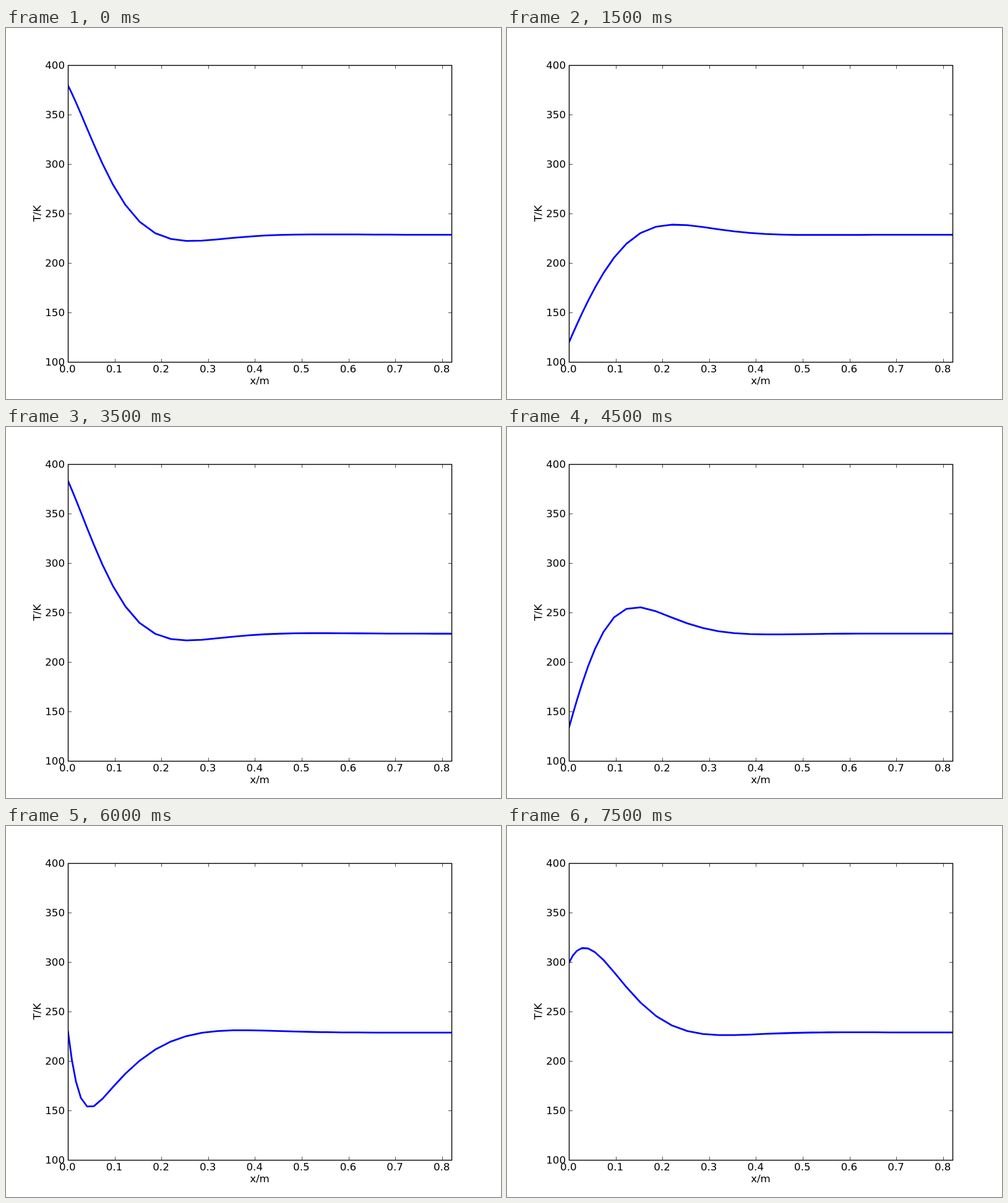
Write an HTML page that moves like this. It is 800x600 px and loops after 8000 ms.

```html
<!DOCTYPE html>
<html lang="en">
<head>
<meta charset="utf-8">
<title>Temperature profile</title>
<style>
  html, body { margin: 0; width: 100%; height: 100%; overflow: hidden; background: #fff; }
  svg { display: block; width: 800px; height: 600px; }
  text { font: 16.67px "DejaVu Sans", sans-serif; fill: #000; text-anchor: middle; }
  .end { text-anchor: end; }
  #curve { fill: none; stroke: #00f; stroke-width: 2.78; stroke-linejoin: round; }
  #ticks { fill: none; stroke: #000; stroke-width: .7; }
  #frame { fill: none; stroke: #000; stroke-width: 1.39; }
</style>
</head>
<body>
<svg viewBox="0 0 800 600">
  <clipPath id="plot"><rect x="100" y="60" width="620" height="480"/></clipPath>
  <polyline id="curve" clip-path="url(#plot)"/>
  <path id="ticks"/>
  <rect id="frame" x="100.5" y="60.5" width="620" height="480"/>
  <g id="labels"></g>
  <text x="410" y="576">x/m</text>
  <text transform="translate(56 300) rotate(-90)">T/K</text>
</svg>
<script>
const $ = id => document.getElementById(id);

const LEFT = 100, TOP = 60, RIGHT = 720, BOTTOM = 540;
const PX_PER_M = 620 / 0.82, PX_PER_K = 1.6;
const toX = m => LEFT + m * PX_PER_M;
const toY = kelvin => BOTTOM - (kelvin - 100) * PX_PER_K;

function drawAxes() {
  const snap = v => Math.round(v) + 0.5;
  const len = 5.6;
  let path = '';
  const label = (x, y, str, cls) => {
    const el = document.createElementNS('http://www.w3.org/2000/svg', 'text');
    el.setAttribute('x', x);
    el.setAttribute('y', y);
    if (cls) el.setAttribute('class', cls);
    el.textContent = str;
    $('labels').append(el);
  };
  for (let i = 0; i <= 8; i++) {
    const x = toX(i / 10);
    path += `M${snap(x)} ${TOP + 0.5}v${len}M${snap(x)} ${BOTTOM + 0.5}v${-len}`;
    label(x - 0.7, 557, (i / 10).toFixed(1));
  }
  for (let k = 100; k <= 400; k += 50) {
    const y = toY(k);
    path += `M${LEFT + 0.5} ${snap(y)}h${len}M${RIGHT + 0.5} ${snap(y)}h${-len}`;
    label(95, y + 6, k, 'end');
  }
  $('ticks').setAttribute('d', path);
}

// Heat conduction into ground lit by a rising and setting sun.
// Time unit: one step of the animation. Flux unit: (T / 100 K)^4.
const STEPS = 16, STEP_MS = 500;
const DAY = 7.087, NOON = -0.571, SUN = 239.4;
const DIFFUSIVITY = 0.00395, CONDUCTIVITY = 0.00188;
const DEEP_T = 230.2, WARM_UP = 5 * 7, SUBSTEPS = 1000;

// Depth grid: fine near the surface, even below.
const depth = [0, 6.5, 13, 21, 31, 42, 56, 73, 93];
for (let i = 0; i <= 20; i++) depth.push(116 + 25.2 * i);
depth.forEach((px, i) => { depth[i] = px / PX_PER_M; });

function simulate() {
  const last = depth.length - 1;
  const gap = depth.slice(1).map((x, i) => x - depth[i]);
  const width = depth.map((_, i) => ((gap[i - 1] || 0) + (gap[i] || 0)) / 2);
  const T = depth.map(() => DEEP_T);
  const dt = 1 / SUBSTEPS;
  const profiles = [];
  for (let step = -WARM_UP; step < STEPS; step++) {
    if (step >= 0) profiles.push(T.slice());
    for (let s = 0; s < SUBSTEPS; s++) {
      const angle = 2 * Math.PI * (step + s * dt - NOON) / DAY;
      const sun = SUN * Math.max(0, Math.cos(angle));
      let above = ((T[0] / 100) ** 4 - sun) / CONDUCTIVITY;
      for (let i = 0; i <= last; i++) {
        const below = i < last ? (T[i + 1] - T[i]) / gap[i] : 0;
        T[i] += dt * DIFFUSIVITY * (below - above) / width[i];
        above = below;
      }
    }
  }
  return profiles;
}

drawAxes();
const curves = simulate().map(profile =>
  profile.map((t, i) => `${toX(depth[i]).toFixed(2)},${toY(t).toFixed(2)}`).join(' '));

let shown = -1;
const start = performance.now();
function render() {
  const step = Math.floor((performance.now() - start) / STEP_MS) % STEPS;
  if (step !== shown) {
    shown = step;
    $('curve').setAttribute('points', curves[step]);
  }
  requestAnimationFrame(render);
}
render();
</script>
</body>
</html>
```
